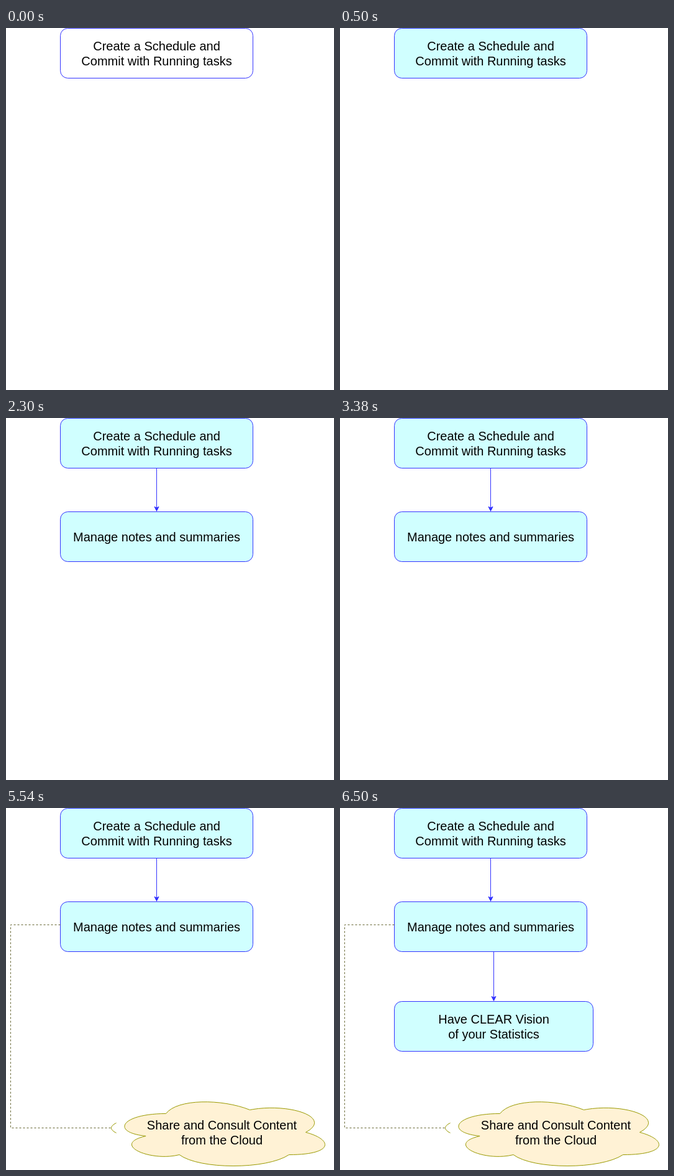
These frames come from a looping animation (528x581 px, 8000 ms). An HTML page:

```html
<!DOCTYPE html>
<html lang="en">
<head>
<meta charset="utf-8">
<title>Workflow steps</title>
<style>
  html, body { margin: 0; width: 100%; height: 100%; overflow: hidden; background: #fff; }
  svg { display: block; width: 528px; height: 581px; }
  text { font: 20px "Liberation Sans", Arial, sans-serif; text-anchor: middle; fill: #000; }
  .box { fill: #d0ffff; stroke: #33f; }
  .arrow { fill: #33f; stroke: #33f; stroke-miterlimit: 10; }
  .cloud { fill: #fff2d5; stroke: #990; stroke-miterlimit: 10; }
  .link { fill: none; stroke: #663; stroke-dasharray: 3 3; stroke-miterlimit: 10; }
  .socket { fill: none; stroke: #990; }

  .first { animation: tint 8s step-end infinite; }
  .notes { animation: notes 8s step-end infinite; }
  .share { animation: share 8s step-end infinite; }
  .stats { animation: stats 8s step-end infinite; }
  @keyframes tint  { 0% { fill: #fff; } 6.25%, 100% { fill: #d0ffff; } }
  @keyframes notes { 0% { visibility: hidden; } 28.75%, 100% { visibility: visible; } }
  @keyframes share { 0% { visibility: hidden; } 51.25%, 100% { visibility: visible; } }
  @keyframes stats { 0% { visibility: hidden; } 81.25%, 100% { visibility: visible; } }
</style>
</head>
<body>
<svg viewBox="0 0 528 581">
  <defs>
    <path id="head" d="M0 -1.1l-3.5 -7 3.5 1.75 3.5 -1.75z"/>
  </defs>

  <g>
    <rect class="box first" x="87.5" y=".5" width="310" height="80" rx="12"/>
    <text x="242.5" y="36">Create a Schedule and</text>
    <text x="242.5" y="60">Commit with Running tasks</text>
  </g>

  <g class="notes">
    <path class="arrow" d="M242.5 80.5V144"/>
    <use class="arrow" href="#head" x="242.5" y="150.5"/>
    <rect class="box" x="87.5" y="150.5" width="310" height="80" rx="12"/>
    <text x="242.5" y="198">Manage notes and summaries</text>
  </g>

  <g class="share">
    <path class="link" d="M87.5 187.5H7.5V513.5H169.5"/>
    <path class="socket" d="M177.5 505.5Q161.5 513.5 177.5 521.5"/>
    <path class="cloud" d="M257.5 490.5
      C185.5 490.5 167.5 520.5 225.1 526.5
      C167.5 539.7 232.3 568.5 279.1 556.5
      C311.5 580.5 419.5 580.5 455.5 556.5
      C527.5 556.5 527.5 532.5 482.5 520.5
      C527.5 496.5 455.5 472.5 392.5 484.5
      C347.5 466.5 275.5 466.5 257.5 490.5z"/>
    <text x="347.5" y="516">Share and Consult Content</text>
    <text x="347.5" y="540">from the Cloud</text>
  </g>

  <g class="stats">
    <path class="arrow" d="M247.5 230.5V304"/>
    <use class="arrow" href="#head" x="247.5" y="310.5"/>
    <rect class="box" x="87.5" y="310.5" width="320" height="80" rx="12"/>
    <text x="247.5" y="346">Have CLEAR Vision</text>
    <text x="247.5" y="370">of your Statistics</text>
  </g>
</svg>
</body>
</html>
```
